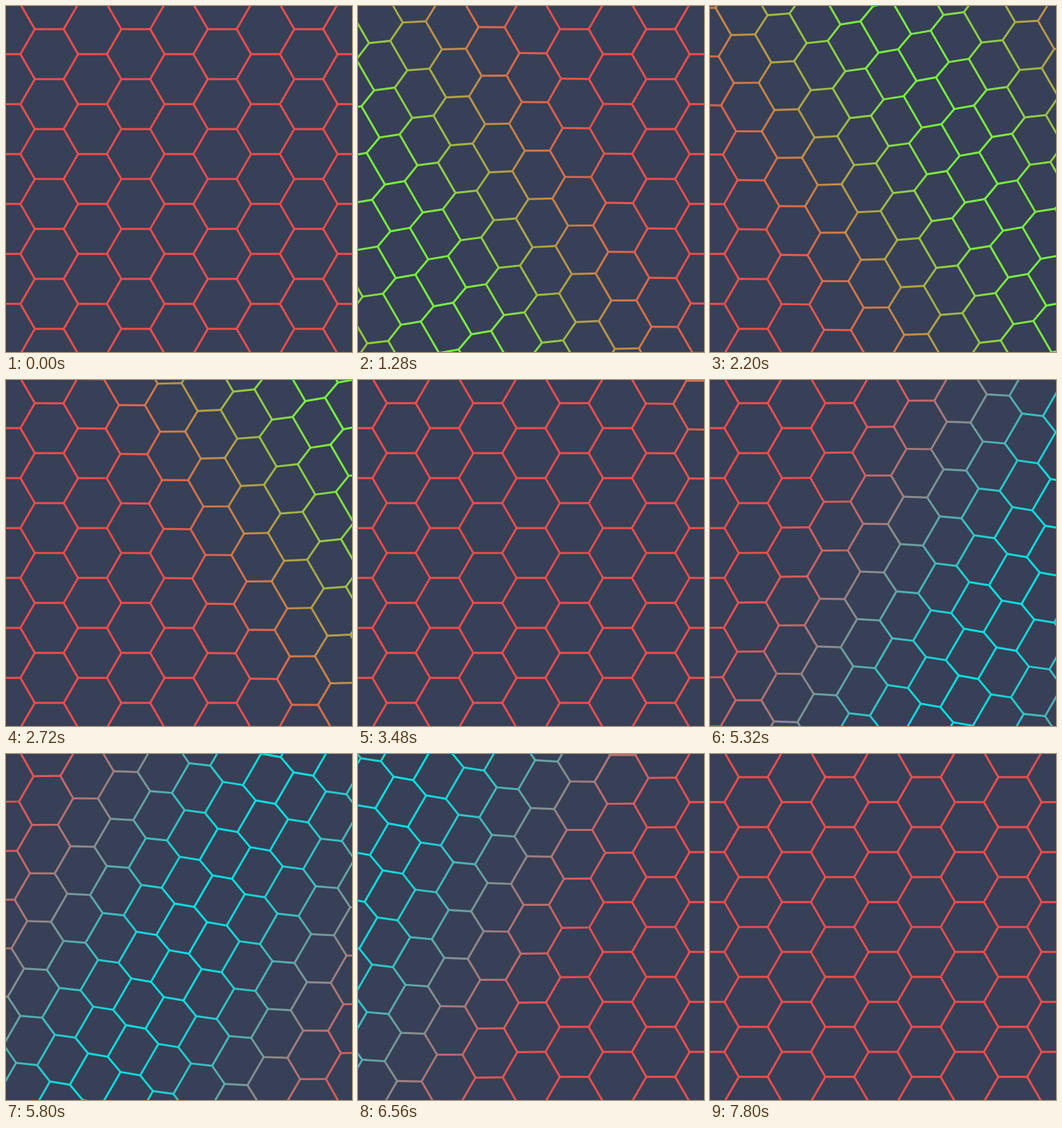
These frames come from a looping animation (540x540 px, 8 s). An HTML page with a canvas:

```html
<!DOCTYPE html>
<html lang="en">
<head>
<meta charset="utf-8">
<title>Honeycomb waves</title>
<style>
  html, body { margin: 0; width: 100%; height: 100%; overflow: hidden; background: #374056; }
  canvas { display: block; width: 100vw; height: 100vh; }
</style>
</head>
<body>
<canvas id="stage" width="540" height="540"></canvas>
<script>
const ctx = document.getElementById('stage').getContext('2d');
const SIZE = 540, LOOP = 8000, STEP = 40;
const SIDE = 45;
const GAP = SIDE * Math.sqrt(3) / 2;  // distance between vertex columns
const ROW = SIDE * 1.5;               // half the spacing of edges in a column
const SHIFT = 4 * GAP;                // travel of each column as a wave passes
const STRETCH = 6;                    // extra half length of edges along the front
const PASS = 2500, DELAY = 100, LEAD = 800;
const BG = '#374056', RED = [238, 76, 78];
const C = Math.sqrt(3) / 2;

// u: direction of travel, v: along the wave front
const waves = [
  { u: [C, -0.5], v: [0.5, C], color: [118, 240, 64] },
  { u: [-C, -0.5], v: [0.5, -C], color: [5, 221, 225] }
];

const clamp = x => Math.max(0, Math.min(1, x));
const bump = x => Math.sin(Math.PI * x) ** 2;
const ease = x => (1 - Math.cos(Math.PI * x)) / 2;

function mix(a, b, f) {
  return `rgb(${a.map((n, i) => Math.round(n + (b[i] - n) * f)).join()})`;
}

function column(k, time) {
  const x = clamp((time - LEAD - DELAY * k) / PASS);
  return {
    x,
    u: k * GAP + SHIFT * ease(x),
    half: SIDE / 2 + STRETCH * bump(x),
    offset: k % 2 ? 0 : ROW
  };
}

function strokeEdges(x, color, addEdges) {
  ctx.strokeStyle = mix(RED, color, bump(x));
  ctx.beginPath();
  for (let n = -4; n <= 4; n++) addEdges(n * 2 * ROW);
  ctx.stroke();
}

function line(u1, v1, u2, v2) {
  ctx.moveTo(u1, v1);
  ctx.lineTo(u2, v2);
}

function draw(time) {
  const { u, v, color } = waves[Math.floor(time / 4000)];
  const local = time % 4000;
  ctx.setTransform(1, 0, 0, 1, 0, 0);
  ctx.fillStyle = BG;
  ctx.fillRect(0, 0, SIZE, SIZE);
  ctx.setTransform(...u, ...v, SIZE / 2, SIZE / 2);
  ctx.lineWidth = 3.2;
  ctx.lineCap = 'round';

  for (let k = -16; k <= 11; k++) {
    const a = column(k, local), b = column(k + 1, local);
    strokeEdges(a.x, color, base => {
      const c = base + a.offset;
      line(a.u, c - a.half, a.u, c + a.half);
    });
    strokeEdges((a.x + b.x) / 2, color, base => {
      const c = base + a.offset;
      line(a.u, c + a.half, b.u, c + ROW - b.half);
      line(a.u, c - a.half, b.u, c - ROW + b.half);
    });
  }
}

const start = performance.now();
function frame() {
  const t = (performance.now() - start) % LOOP;
  draw(Math.floor(t / STEP) * STEP);
  requestAnimationFrame(frame);
}
frame();
</script>
</body>
</html>
```
